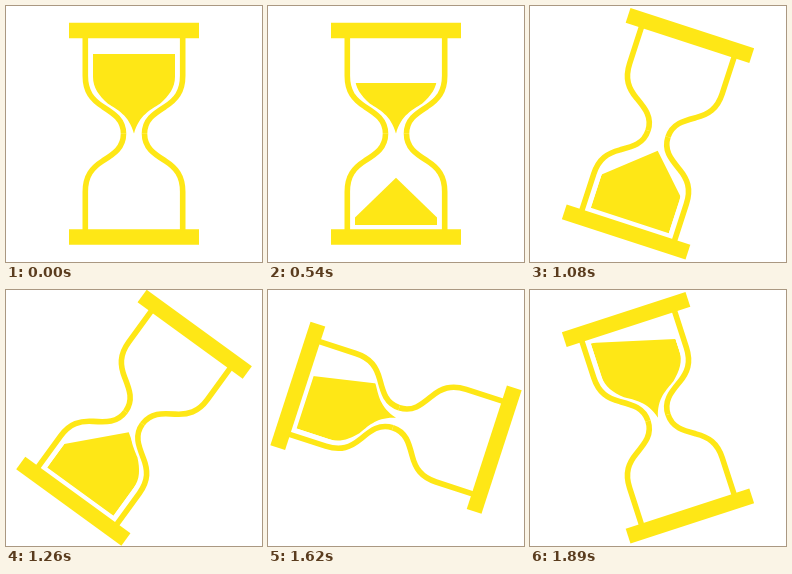
An HTML page for the animation above (1.98 s loop, 256 by 256 pixels).

```html
<!DOCTYPE html>
<html lang="en">
<head>
<meta charset="utf-8">
<title>Hourglass</title>
<style>
  html, body { margin: 0; width: 100%; height: 100%; overflow: hidden; background: #fff; }
  svg { display: block; width: 100vw; height: 100vh; }
  .fill { fill: #fee716; }
  .line { fill: none; stroke: #fee716; stroke-width: 5.6; }
</style>
</head>
<body>
<svg viewBox="0 0 256 256">
  <defs>
    <!-- Room for sand in the lower bulb; the upper bulb is the same, turned over -->
    <clipPath id="bulb">
      <path d="M-41 91.2V57C-41 46-35 38-26 30C-17 24-5 19 0 0C5 19 17 24 26 30C35 38 41 46 41 57V91.2Z"/>
    </clipPath>
    <g id="half">
      <rect class="fill" x="-65" y="95.5" width="130" height="15.5"/>
      <path class="line" d="M-48.7 97V58C-48.7 42-42 34-31 27C-20 20-10.5 14-10.5 0"/>
      <path class="line" d="M48.7 97V58C48.7 42 42 34 31 27C20 20 10.5 14 10.5 0"/>
    </g>
  </defs>
  <g id="glass">
    <use href="#half"/>
    <use href="#half" transform="rotate(180)"/>
    <g clip-path="url(#bulb)"><polygon id="lower" class="fill"/></g>
    <g transform="rotate(180)">
      <g clip-path="url(#bulb)"><polygon id="upper" class="fill"/></g>
    </g>
  </g>
</svg>
<script>
  const STEP = 90, LOOP = 1980, EMPTY = 11, FLOOR = 91.2;
  const glass = document.getElementById('glass');
  const lower = document.getElementById('lower');
  const upper = document.getElementById('upper');
  const lerp = (a, b, k) => a + (b - a) * k;
  const setPoints = (el, pts) => el.setAttribute('points', pts.join(' '));

  // Sand surface from the base to the wall, for turns 5 to 9
  const slides = [
    [[-33, 92], [-22, 26]],
    [[-14, 92], [-26.5, 29]],
    [[0, 92], [-41, 44]],
    [[12, 92], [-41, 56]],
    [[41, 92], [-41, 69.5]]
  ];

  function topSand(n) {
    if (n >= EMPTY) return [];
    const level = 79.75 - 3.117 * n - 0.283 * n * n;
    return [[-44, 0], [44, 0], [44, level], [-44, level]];
  }

  function pile(n) {
    if (n === 0) return [];
    const height = n < 4 ? 18 * Math.sqrt(n) : 36 + 5.6 * (n - 4);
    const half = height / (1.06 - 0.0146 * n);
    return [[0, FLOOR - height], [half, FLOOR], [-half, FLOOR]];
  }

  function tilted(turn) {
    if (turn < 5) {
      const k = (turn - 1) / 3;
      return [
        [-44, 92], [-41, lerp(56.3, 74, k)],
        [lerp(5, 2.6, k), lerp(16.3, 11.6, k)],
        [42, lerp(54, 11, k)], [44, 92]
      ];
    }
    const [base, wall] = slides[turn - 5];
    return [base, wall, [wall[0], 0], [44, 0], [44, 92]];
  }

  function draw(time) {
    const n = Math.floor(time % LOOP / STEP);
    // The first tilt is held for two steps
    const turn = n < 12 ? 0 : Math.max(1, n - 12);
    glass.setAttribute('transform', `translate(128 127.75) rotate(${turn * 18})`);
    setPoints(upper, topSand(n));
    setPoints(lower, turn ? tilted(turn) : pile(n));
  }

  const start = performance.now();
  function tick(now) {
    draw(Math.max(0, now - start));
    requestAnimationFrame(tick);
  }
  tick(start);
</script>
</body>
</html>
```
